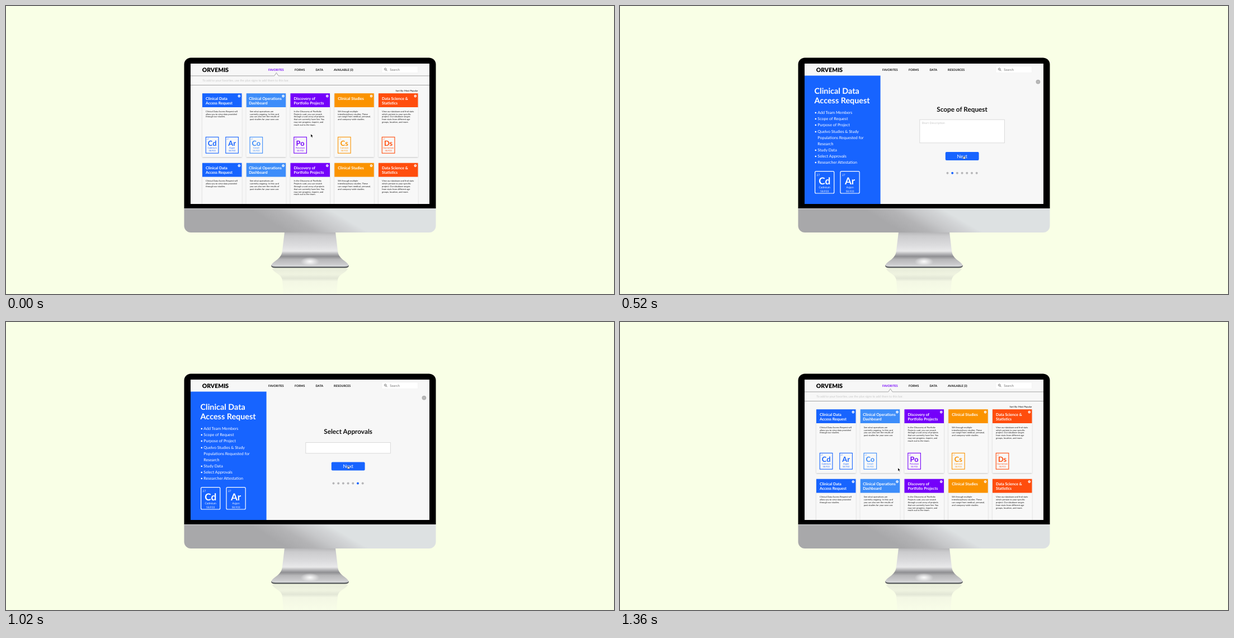
An HTML page that plays this animation: 1087 px wide and 515 px high, repeating every 1380 ms.

```html
<!DOCTYPE html>
<html lang="en">
<head>
<meta charset="utf-8">
<title>Clinical request walkthrough</title>
<style>
  html, body { margin: 0; width: 100%; height: 100%; overflow: hidden; background: #f9ffe6; }
  svg { display: block; width: 100%; height: 100%; }
  text { font-family: Lato, "Open Sans", sans-serif; text-rendering: geometricPrecision; white-space: pre; }
  .page { opacity: 0; animation: 1380ms step-end infinite; }
  #home { animation-name: home; }
  #form { animation-name: form; }
  #members { animation-name: members; }
  #scope { animation-name: scope; }
  #purpose { animation-name: purpose; }
  #studies { animation-name: studies; }
  #data { animation-name: data; }
  #approvals { animation-name: approvals; }
  #attest { animation-name: attest; }
  #hand { animation-name: hand; }
  #arrow { animation-name: arrow; }
  #cursor { animation: move 1380ms linear infinite; }

  @keyframes home { 0% { opacity: 1 } 7.24% { opacity: 0 } 94.2% { opacity: 1 } 100% { opacity: 1 } }
  @keyframes form { 0% { opacity: 0 } 7.24% { opacity: 1 } 94.2% { opacity: 0 } }
  @keyframes members { 0% { opacity: 0 } 7.24% { opacity: 1 } 26.08% { opacity: 0 } }
  @keyframes scope { 0% { opacity: 0 } 26.08% { opacity: 1 } 40.57% { opacity: 0 } }
  @keyframes purpose { 0% { opacity: 0 } 40.57% { opacity: 1 } 47.82% { opacity: 0 } }
  @keyframes studies { 0% { opacity: 0 } 47.82% { opacity: 1 } 59.42% { opacity: 0 } }
  @keyframes data { 0% { opacity: 0 } 59.42% { opacity: 1 } 68.11% { opacity: 0 } }
  @keyframes approvals { 0% { opacity: 0 } 68.11% { opacity: 1 } 78.26% { opacity: 0 } }
  @keyframes attest { 0% { opacity: 0 } 78.26% { opacity: 1 } 94.2% { opacity: 0 } }
  @keyframes hand {
    0% { opacity: 0 } 21% { opacity: 1 } 26.08% { opacity: 0 } 31.8% { opacity: 1 } 47.82% { opacity: 0 }
    53.6% { opacity: 1 } 59.42% { opacity: 0 } 63.7% { opacity: 1 } 78.26% { opacity: 0 }
    81.8% { opacity: 1 } 94.2% { opacity: 0 }
  }
  @keyframes arrow {
    0% { opacity: 1 } 21% { opacity: 0 } 26.08% { opacity: 1 } 31.8% { opacity: 0 } 47.82% { opacity: 1 }
    53.6% { opacity: 0 } 59.42% { opacity: 1 } 63.7% { opacity: 0 } 78.26% { opacity: 1 }
    81.8% { opacity: 0 } 94.2% { opacity: 1 } 100% { opacity: 1 }
  }
  @keyframes move {
    0%, 1.45% { transform: translate(545px, 229px) }
    6.5%, 10.2% { transform: translate(393px, 217px) }
    21.7%, 26.8% { transform: translate(656px, 258px) }
    32.6%, 39.2% { transform: translate(614.5px, 268px) }
    47.8%, 52.2% { transform: translate(614.5px, 267px) }
    55.8%, 60.1% { transform: translate(611.5px, 248px) }
    64.5%, 68.5% { transform: translate(611.5px, 272px) }
    72.5%, 78.3% { transform: translate(611.5px, 257px) }
    82.6%, 93.5% { transform: translate(614px, 300px) }
    98.5%, 100% { transform: translate(497px, 261px) }
  }
</style>
</head>
<body>
<svg viewBox="0 0 1087 515" preserveAspectRatio="none">
  <defs>
    <clipPath id="screen"><rect x="330" y="103" width="427" height="251"/></clipPath>
    <clipPath id="body"><rect x="318.5" y="92.5" width="450" height="312.5" rx="12"/></clipPath>
    <linearGradient id="chin" gradientUnits="userSpaceOnUse" x1="470" y1="384" x2="506" y2="322">
      <stop offset="0" stop-color="#a8a8aa"/><stop offset=".35" stop-color="#b4b4b6"/>
      <stop offset=".6" stop-color="#c6c7c9"/><stop offset=".85" stop-color="#d3d5d7"/>
      <stop offset="1" stop-color="#dde1e2"/>
    </linearGradient>
    <linearGradient id="neck" x2="0" y2="1">
      <stop offset="0" stop-color="#b4b4b6"/><stop offset=".12" stop-color="#cbcbcd"/>
      <stop offset=".4" stop-color="#dcdcde"/><stop offset=".57" stop-color="#e9e9ea"/>
      <stop offset=".65" stop-color="#b9b9bb"/><stop offset=".73" stop-color="#8f8f92"/>
      <stop offset=".82" stop-color="#b6b6b8"/><stop offset="1" stop-color="#d0d0d2"/>
    </linearGradient>
    <radialGradient id="shine">
      <stop offset="0" stop-color="#fff" stop-opacity=".95"/><stop offset="1" stop-color="#fff" stop-opacity="0"/>
    </radialGradient>
    <linearGradient id="mirror" x2="0" y2="1">
      <stop offset="0" stop-color="#e9eddb"/><stop offset=".22" stop-color="#eff3e0"/>
      <stop offset=".38" stop-color="#e2e6d6"/><stop offset=".5" stop-color="#f3f7e4"/>
      <stop offset="1" stop-color="#f8fde8"/>
    </linearGradient>
    <filter id="shadow" x="-10%" y="-10%" width="120%" height="120%">
      <feDropShadow dx="0" dy="1" stdDeviation="1.2" flood-opacity=".2"/>
    </filter>
  </defs>

  <path fill="url(#mirror)" d="M476 470H611C607 478 595 479 593 490L591 515H496L494 490C492 479 480 478 476 470Z"/>
  <path fill="url(#neck)" d="M498 404H589L593 437C594 453 609 455 613 464H474C478 455 493 453 494 437Z"/>
  <ellipse cx="543.5" cy="457" rx="17" ry="8" fill="url(#shine)"/>
  <path fill="#606365" d="M474 463.5H613Q613 468.5 606 468.5H481Q474 468.5 474 463.5Z"/>
  <path fill="#d2d3d5" d="M474 463H613Q612 466 605 466H482Q475 466 474 463Z"/>
  <g clip-path="url(#body)">
    <rect x="318" y="92" width="451" height="270"/>
    <rect x="318" y="362" width="451" height="44" fill="url(#chin)"/>
    <path d="M318 362.4H769" stroke="#e9eaeb" stroke-width=".8"/>
  </g>

  <g clip-path="url(#screen)">
    <rect x="330" y="103" width="427" height="251" fill="#f7f7f7"/>
    <g id="common"></g>
    <g id="home" class="page"></g>
    <g id="form" class="page"></g>
    <g id="members" class="page"></g>
    <g id="scope" class="page"></g>
    <g id="purpose" class="page"></g>
    <g id="studies" class="page"></g>
    <g id="data" class="page"></g>
    <g id="approvals" class="page"></g>
    <g id="attest" class="page"></g>
    <g id="cursor">
      <path id="arrow" class="page" fill="#000" stroke="#fff" stroke-width=".35" d="M0 0V5.4L1.3 4.3L2.2 6.4L3.1 6L2.2 4H4Z"/>
      <path id="hand" class="page" fill="#fff" stroke="#111" stroke-width=".5"
        d="M-.5 .4Q0 -.3 .6 .4V2L2.8 2.5Q3.3 2.7 3.1 3.5L2.6 5.4H-.3L-1.8 3.4Q-1.6 2.7 -.5 3.3Z"/>
    </g>
  </g>
</svg>

<script>
const BLUE = '#1764ff', GREY = '#b6b6b8', PALE = '#c6c6c6', MID = 611.6;
const fill = (id, ...parts) => document.getElementById(id).innerHTML = parts.flat(9).join('');

// y is the baseline
const text = (x, y, str, size, color = '#111', weight = 400, extra = '') =>
  `<text x="${x}" y="${y}" font-size="${size}" fill="${color}" font-weight="${weight}" ${extra}>${str}</text>`;
const centred = (x, y, str, size, color, weight, extra = '') =>
  text(x, y, str, size, color, weight, 'text-anchor="middle" ' + extra);
const lines = (x, y, step, list, ...style) => list.map((s, i) => text(x, y + i * step, s, ...style));
const rect = (x, y, w, h, color, extra = '') =>
  `<rect x="${x}" y="${y}" width="${w}" height="${h}" fill="${color}" ${extra}/>`;

const nav = (last, first = '#111') => [
  text(469, 115.9, 'FAVORITES', 5.25, first, 700),
  text(516, 115.9, 'FORMS', 5.25, '#111', 700),
  text(553.5, 115.9, 'DATA', 5.25, '#111', 700),
  text(586, 115.9, last, 5.25, '#111', 700)
];

fill('common',
  text(350.8, 117.9, 'ORVEMIS', 10.4, '#000', 900),
  rect(672, 108, 64.3, 11.2, '#fff', 'stroke="#ededed" stroke-width=".5"'),
  '<path d="M679.4 114.2L681.4 116.2" stroke="#555" stroke-width=".9"/>',
  '<circle cx="678.2" cy="112.8" r="1.7" fill="none" stroke="#555" stroke-width=".8"/>',
  text(686.2, 115.6, 'Search', 6, '#777'));

// Dashboard
const cards = [
  { color: BLUE, dx: 6, head: ['Clinical Data', 'Access Request'],
    body: ['Clinical Data Access Request will', 'allow you to view data provided', 'through our studies.'],
    tiles: [['Cd', 'Cadmium'], ['Ar', 'Argon']] },
  { color: '#3d8dfa', dx: 4.4, head: ['Clinical Operations', 'Dashboard'],
    body: ['See what operations are', 'currently ongoing. In this card', 'you can also see the results of', 'past studies for your own use.'],
    tiles: [['Co', 'Cobalt']] },
  { color: '#7400fa', dx: 6, head: ['Discovery of', 'Portfolio Projects'],
    body: ['In the Discovery of Portfolio', 'Projects card, you can search', 'through a vast array of projects', 'that we currently have live. You', 'may see progress, inquire, and', 'reach out to the team.'],
    tiles: [['Po', 'Polonium']] },
  { color: '#fb9300', dx: 6, head: ['Clinical Studies'],
    body: ['Sift through multiple', 'interdisciplinary studies. These', 'can range from medical, personal,', 'and company-wide studies.'],
    tiles: [['Cs', 'Caesium']] },
  { color: '#ff4d0d', dx: 6, head: ['Data Science &amp;', 'Statistics'],
    body: ['View our database and find stats', 'which pertain to your specific', 'project. Our database ranges', 'from stats from different age', 'groups, location, and more.'],
    tiles: [['Ds', 'Darmstium']] }
];

const smallTile = (x, y, [sym, name], c) => [
  rect(x, y, 22.6, 28.8, 'none', `stroke="${c}" stroke-width="1.1"`),
  text(x + 1.8, y + 4.8, '27', 3.2, c),
  centred(x + 11.3, y + 15.3, sym, 12.8, c, 700),
  centred(x + 11.3, y + 20.9, name, 3.9, c),
  centred(x + 11.3, y + 25.6, '58.933', 3.9, c)
];

const card = (c, i, y) => {
  const x = 351 + i * 78.75;
  return [
    rect(x, y, 70.5, 113.8, '#f8f8f8', 'filter="url(#shadow)"'),
    rect(x, y, 70.5, 24.8, c.color),
    lines(x + c.dx, y + 11.4, 8.2, c.head, 6.95, '#fff', 700),
    `<circle cx="${x + 65.8}" cy="${y + 4.9}" r="2.3" fill="#fff"/>`,
    `<path d="M${x + 64.8} ${y + 4.9}h2m-1 -1v2" stroke="${c.color}" stroke-width=".6"/>`,
    lines(x + 6, y + 33.6, 4.82, c.body, 4.03, '#222'),
    c.tiles.map((t, k) => smallTile(x + 6.3 + k * 35.5, y + 78.2, t, c.color))
  ];
};

fill('home',
  nav('AVAILABLE (3)', '#7400fa'),
  '<path d="M330 124.9H479.8L483.4 119.3L487 124.9H757M330 141.5H757" fill="none" stroke="#909090" stroke-width=".8"/>',
  text(351.2, 134.9, 'To add to your favorites, use the plus signs to add them to this bar.', 5.33, PALE),
  text(696.5, 153, 'Sort By: Most Popular', 4.15, '#000'),
  [156.2, 280.7].map(y => cards.map((c, i) => card(c, i, y))));

// Request form
const bigTile = (x, sym, name) => [
  rect(x, 295.7, 34.2, 39.3, 'none', 'rx="2" stroke="#fff" stroke-width="1.2"'),
  text(x + 3, 303.7, '27', 4.8, '#fff'),
  centred(x + 17.1, 318.6, sym, 17.2, '#fff', 700),
  centred(x + 17.1, 326.3, name, 4.9, '#fff'),
  centred(x + 17.1, 332.8, '58.933', 4.85, '#fff')
];

const item = (row, str) => [text(347.8, 193.2 + row * 11.12, '•', 7.1, '#fff'), text(353.3, 193.2 + row * 11.12, str, 7.12, '#fff')];

fill('form',
  nav('RESOURCES'),
  rect(330, 124.5, 135.6, 230, BLUE),
  lines(347.6, 157.2, 17.1, ['Clinical Data', 'Access Request'], 14.35, '#fff', 700),
  item(0, 'Add Team Members'), item(1, 'Scope of Request'), item(2, 'Purpose of Project'),
  item(3, 'Quelvo Studies &amp; Study'),
  lines(353.3, 237.7, 11.12, ['Populations Requested for', 'Research'], 7.12, '#fff'),
  item(6, 'Study Data'), item(7, 'Select Approvals'), item(8, 'Researcher Attestation'),
  bigTile(348.6, 'Cd', 'Cadmium'), bigTile(394, 'Ar', 'Argon'));

const title = (y, str) => centred(MID, y, str, 11.75, '#111', 700);
const field = (y, h) => rect(535.9, y, 151.5, h, '#fff', 'stroke="#d2d2d2" stroke-width=".8"');
const button = (x, y, str, color = BLUE) =>
  [rect(x, y, 59.8, 15.2, color, 'rx="2"'), centred(x + 29.9, y + 10.7, str, 8.75, '#fff')];
const dots = (y, active) => Array.from({ length: 7 }, (_, i) =>
  `<circle cx="${585.5 + i * 8.7}" cy="${y}" r="2" fill="${i === active ? BLUE : GREY}"/>`);
const close = y => `<circle cx="747.4" cy="${y}" r="3.9" fill="#b3b3b3"/>
  <path d="M746.1 ${y}h2.6m-1.3 -1.3v2.6" stroke="#cfcfcf" stroke-width=".6"/>`;

fill('members', close(135.6), title(200.1, 'Add Team Members'), field(215.6, 19.2),
  button(535.8, 250.4, 'Add Member', '#06c24c'), button(627.8, 250.4, 'Next'), dots(288.5, 0));

const describe = (id, name, step) => fill(id, close(135.6), title(189.3, name), field(203.2, 41.6),
  text(539.4, 210.8, 'Short Description', 5.35, PALE), button(581.8, 260.9, 'Next'), dots(298.8, step));
describe('scope', 'Scope of Request', 1);
describe('purpose', 'Purpose of Project', 2);

const facts = [
  ['Study Title:', 'Generic Double-Blind Study in Regards to Health'], ['Study Number:', 'K43-313'],
  ['Product Name:', 'Velquari'], ['Dev Moniker:', 'GIP-342'], ['Therapeutic Area:', 'Oncology']
];
fill('studies', close(134.6),
  title(176.6, 'Quelvo Studies &amp; Study Populations'), title(190.5, 'Requested for Research'),
  field(206, 19.2), text(540.4, 217.6, 'Search', 5.6, PALE),
  button(581.7, 240.8, 'Next'), dots(279, 3),
  facts.map(([k, v], i) => [
    text(503.3, 307.8 + i * 11.9, k, 5.3, '#111', 700),
    text(553.4, 307.8 + i * 11.9, v, 5.35)
  ]));

fill('data', close(134.6), title(195.6, 'Study Data'),
  text(539.4, 206.9, 'Data Types Requested:', 5.3), field(210.1, 41.6),
  lines(539.4, 217.9, 6.5, ['Derived Clinical Data', 'Clinical Biomarker Data', 'Genomics Data', 'PK Data'], 5.35, PALE),
  button(581.8, 267.9, 'Next'), dots(306, 4));

fill('approvals', close(135.6), title(200.1, 'Select Approvals'), field(215.6, 19.2),
  button(581.8, 250.4, 'Next'), dots(288.5, 5));

const bullet = y => text(495.6, y, '•', 4.75);
fill('attest', close(136), title(169.2, 'Researcher Attestation'),
  centred(MID, 176.7, '(signed forms cannot be saved as a draft)', 5.1, '#666', 400, 'font-style="italic"'),
  text(488, 185.8, '<tspan font-weight="700">Request and attestation from Researcher</tspan> “Researcher” should be the lead Quelvo Investigator or Scientist', 5.35),
  [192.5, 198.2, 209.7].map(bullet),
  lines(499, 192.5, 5.73, [
    'I attest that I am appropriately trained and authorized to request clinical data for internal, secondary use',
    'I attest that these data will be used internally by authorized Quelvo researcher and that these data will',
    'not be shared outside of Quelvo',
    'I attest that these data will only be used for secondary, exploratory analyses and that no attempt will be',
    'made to re-analyze or re-interpret the primary efficacy or safety of the asset'
  ], 4.75),
  text(535.4, 227.4, 'Username:', 4.15), field(230.5, 19),
  text(535.4, 258.5, 'Password:', 4.15), field(261.5, 19),
  button(581.8, 292, 'Sign Forms'), dots(326.2, 6));
</script>
</body>
</html>
```
